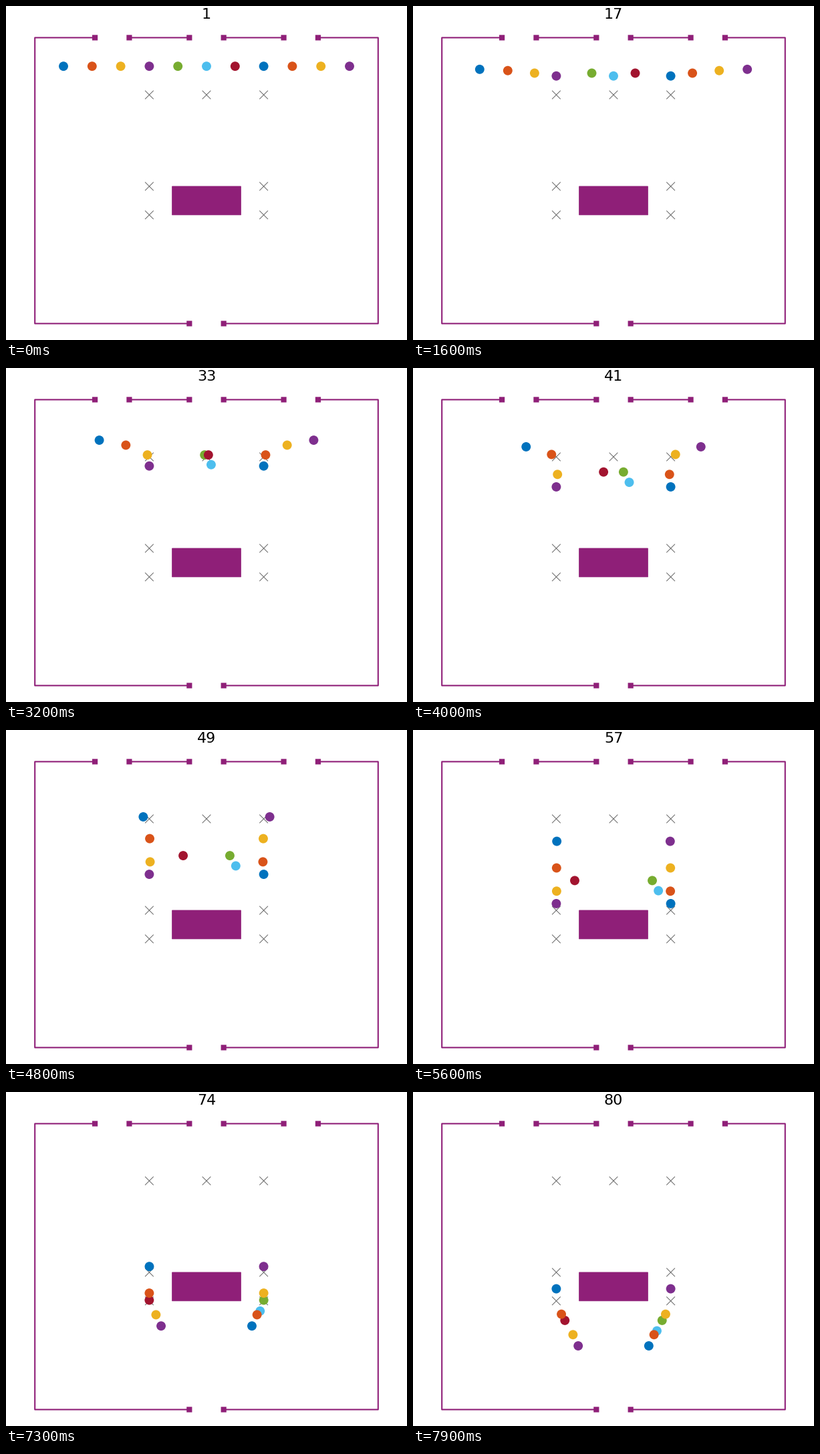
A matplotlib script for the animation above (8000 ms loop, 600 px wide and 500 px high).

```python
import numpy as np
import matplotlib.pyplot as plt
from matplotlib.animation import FuncAnimation
from matplotlib.patches import Rectangle

STEPS, DT = 80, 0.1
ACCEL, V_MAX = 0.25, 1.3
SCALE, X0, Y0 = 42.8, 43.2, 475.4  # pixels per metre, pixel place of the origin
W, H, MID, DOOR = 12, 10, 6, 1.2
WALL = "#8F1F78"
COLORS = ["#0072BD", "#D95319", "#EDB120", "#7E2F8E", "#77AC30", "#4DBEEE", "#A2142F"]


def route(x):
    """Waypoints for the walker that starts at (x, 9)."""
    central = abs(x - MID) <= 1
    side = MID - 2 if x < 5 or x == 7 else MID + 2
    return np.array([(MID if central else side, 8), (side, 4.8), (side, 3.8), (MID, -0.2)])


def walk(x):
    """Speed up to V_MAX, heading for each waypoint until it is passed."""
    goals, k = route(x), 0
    pos, speed = np.array([x, 9.0]), 0.0
    path = [pos]
    for _ in range(STEPS - 1):
        speed = min(speed + ACCEL * DT, V_MAX)
        gap = goals[k] - pos
        pos = pos + gap / np.hypot(*gap) * speed * DT
        if pos[1] < goals[k][1] and k < len(goals) - 1:
            k += 1
        path.append(pos)
    return path


def line(points, **style):
    ax.plot(*zip(*points), snap=False, **style)


def box(x, y, w, h, **style):
    """Filled rectangle centred on (x, y)."""
    ax.add_patch(Rectangle((x - w / 2, y - h / 2), w, h, color=WALL, snap=False, **style))


def door(x, y):
    """Posts on both sides of a gap; returns their places."""
    posts = [(x - DOOR / 2, y), (x + DOOR / 2, y)]
    for post in posts:
        box(*post, 8.2 / SCALE, 8.2 / SCALE, lw=0)
    return posts


def cross(x, y, r=6 / SCALE):
    for s in (-1, 1):
        line([(x - r, y - s * r), (x + r, y + s * r)], color="#666666", lw=0.7)


fig = plt.figure(figsize=(6, 5), dpi=100, facecolor="white")
ax = fig.add_axes([0, 0, 1, 1])
ax.set_xlim(-X0 / SCALE, (600 - X0) / SCALE)
ax.set_ylim((Y0 - 500) / SCALE, Y0 / SCALE)
ax.axis("off")

# Once round the room, from door to door
loop = door(MID, 0)[:1] + [(0, 0), (0, H)]
for x in (2.7, MID, W - 2.7):
    left, right = door(x, H)
    line(loop + [left], color=WALL, lw=1.5)
    loop = [right]
line(loop + [(W, H), (W, 0), (MID + DOOR / 2, 0)], color=WALL, lw=1.5)
box(MID, 4.3, 2.4, 1, lw=0.6)

# The middle walkers lie below the others
starts = sorted(range(1, W), key=lambda x: abs(x - MID) > 1)
for goal in {tuple(g) for x in starts for g in route(x)[:-1]}:
    cross(*goal)

paths = np.array([walk(x) for x in starts])
dots = ax.scatter(*paths[:, 0].T, s=100, linewidths=0, zorder=3,
                  c=[COLORS[(x - 1) % len(COLORS)] for x in starts])
count = fig.text(0.5, 1 - 19 / 500, "1", ha="center", va="baseline",
                 fontsize=16, family="DejaVu Sans")


def draw(i):
    dots.set_offsets(paths[:, i])
    count.set_text(str(i + 1))
    return dots, count


anim = FuncAnimation(fig, draw, frames=STEPS, interval=1000 * DT, repeat=True)
plt.show()
```
